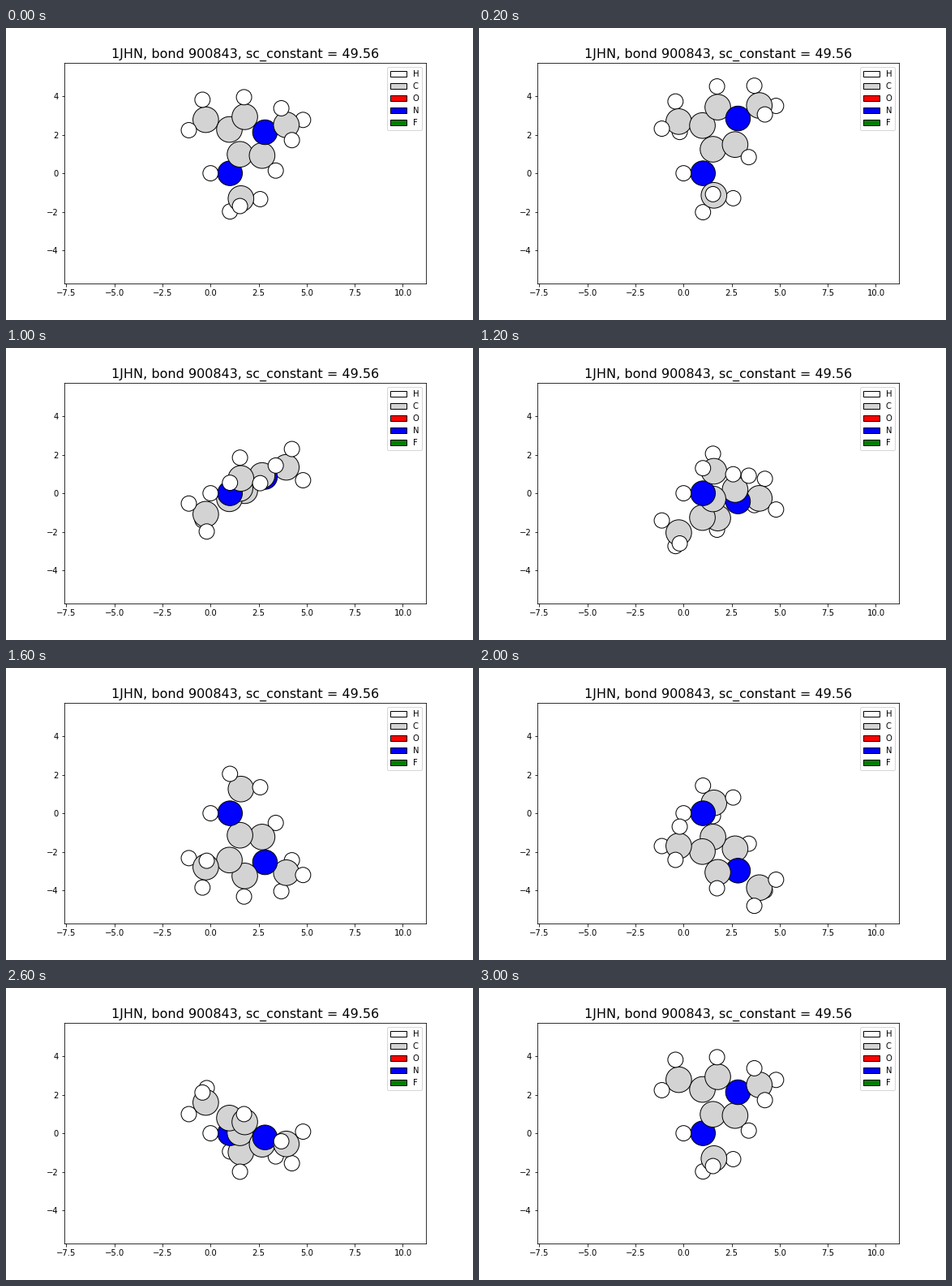
Write a matplotlib script that moves like this. It is 576 px wide and 360 px high and loops after 3.2 s.

```python
import numpy as np
import matplotlib.pyplot as plt
from matplotlib.animation import FuncAnimation
from matplotlib.patches import Patch

STEPS = 16
COLORS = {"H": "white", "C": "lightgray", "O": "red", "N": "blue", "F": "green"}
RADII = {"H": 0.25, "C": 0.70, "N": 0.65}

# element, x, y, z; the N-H bond lies on the x axis
ATOMS = [
    ("N", 1.01, 0, 0),
    ("H", 0, 0, 0),
    ("C", 1.53, 0.985, 0.856),
    ("C", 0.98, 2.277, 0.985),
    ("C", -0.25, 2.785, 0.352),
    ("H", -0.42, 3.822, 0.591),
    ("H", -1.13, 2.239, 0.676),
    ("H", -0.20, 2.682, -0.746),
    ("C", 1.78, 2.937, 1.850),
    ("H", 1.74, 3.954, 2.219),
    ("N", 2.83, 2.134, 2.212),
    ("C", 3.94, 2.516, 3.012),
    ("H", 3.68, 3.379, 3.604),
    ("H", 4.81, 2.774, 2.383),
    ("H", 4.23, 1.722, 3.650),
    ("C", 2.68, 0.922, 1.599),
    ("H", 3.39, 0.140, 1.746),
    ("C", 1.58, -1.316, 0.134),
    ("H", 1.01, -1.986, -0.515),
    ("H", 1.53, -1.704, 1.155),
    ("H", 2.58, -1.345, -0.170),
]

elements = [a[0] for a in ATOMS]
x, y, z = np.array([a[1:] for a in ATOMS], float).T
sizes = np.array([RADII[e] for e in elements]) * 1000 / RADII["C"]
faces = np.array([COLORS[e] for e in elements])

fig, ax = plt.subplots(figsize=(8, 5), dpi=72)
fig.subplots_adjust(left=0.125, right=0.9, bottom=0.125, top=0.88)
ax.set_xlim(-7.603, 11.22)
ax.set_ylim(-5.73, 5.73)
ax.set_title("1JHN, bond 900843, sc_constant = 49.56", fontsize=16)
ax.legend(
    handles=[Patch(facecolor=c, edgecolor="black", label=e) for e, c in COLORS.items()],
    loc="upper right",
)
balls = ax.scatter(x, y, s=sizes, c=faces, edgecolors="black", linewidths=1)


def update(step):
    """Turn the molecule about the x axis and paint it back to front."""
    angle = 2 * np.pi * step / (STEPS - 1)
    height = y * np.cos(angle) + z * np.sin(angle)
    depth = z * np.cos(angle) - y * np.sin(angle)
    order = np.argsort(depth, kind="stable")
    balls.set_offsets(np.column_stack([x, height])[order])
    balls.set_sizes(sizes[order], dpi=fig.dpi)
    balls.set_facecolor(faces[order])
    return (balls,)


anim = FuncAnimation(fig, update, frames=STEPS, interval=200, repeat=True, repeat_delay=0)
plt.show()
```
